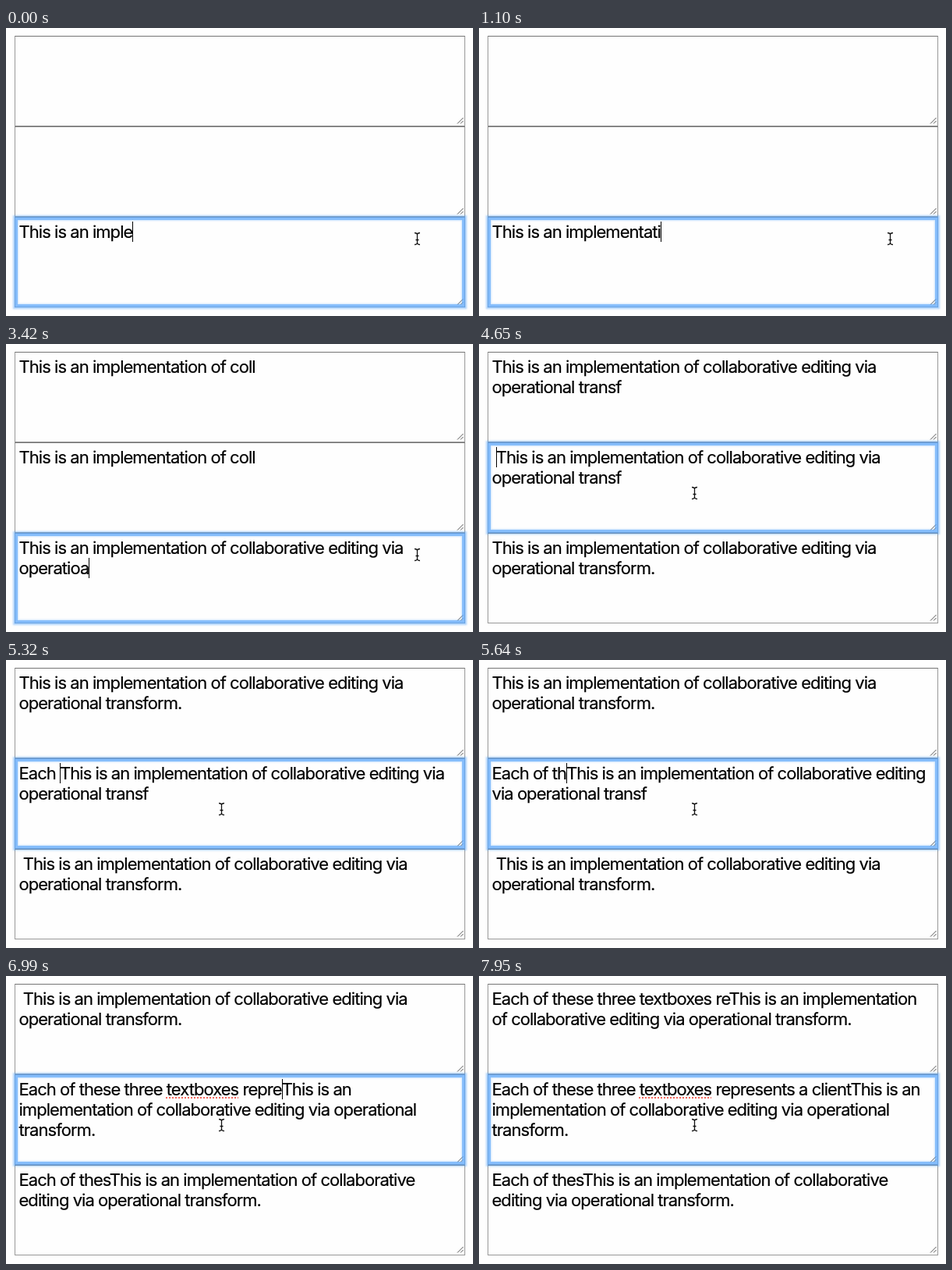
An HTML page for the animation above (8000 ms loop, 599x369 px).

```html
<!DOCTYPE html>
<html lang="en">
<head>
<meta charset="utf-8">
<title>Collaborative editing</title>
<style>
  html, body { margin: 0; width: 100%; height: 100%; overflow: hidden; background: #fff; }
  #stage { position: relative; width: 599px; height: 369px; overflow: hidden; background: #fefefe; }
  .box {
    position: absolute; left: 11px; width: 578px; height: 116px; box-sizing: border-box;
    border: 1px solid #999; border-top-color: #757575; background: #fefefe;
  }
  .box.focus { z-index: 1; }
  .box.focus::after {
    content: ''; position: absolute; inset: -1px;
    box-shadow: 0 0 2px 2px rgb(94 168 250 / .5),
      inset 0 0 0 4px rgb(94 168 250 / .65), inset 0 0 2px 5px rgb(94 168 250 / .3);
  }
  .text {
    position: absolute; left: 4.5px; top: 5px; width: 565px;
    font: 22px/26px Inter, Roboto, sans-serif; font-optical-sizing: none;
    letter-spacing: -.96px; white-space: pre-wrap; color: #000;
    -webkit-text-stroke: .2px #000;
  }
  .caret { position: absolute; width: 1px; height: 26px; background: #000; }
  .misspelt {
    text-decoration: underline dotted #f4665c 2px;
    text-underline-offset: 2px; text-decoration-skip-ink: none;
  }
  .grip { position: absolute; right: 1px; bottom: 2px; }
  #pointer { position: absolute; left: -6px; top: -9px; z-index: 2; }
</style>
</head>
<body>
<div id="stage">
  <svg id="pointer" width="12" height="18" fill="none">
    <path id="beam" d="M2.5 1.5Q6 1.5 6 4V14Q6 16.5 2.5 16.5M9.5 1.5Q6 1.5 6 4M6 14Q6 16.5 9.5 16.5M4 10.5H8" stroke="#fff" stroke-width="3"/>
    <use href="#beam" style="display:none"/>
    <path d="M2.5 1.5Q6 1.5 6 4V14Q6 16.5 2.5 16.5M9.5 1.5Q6 1.5 6 4M6 14Q6 16.5 9.5 16.5M4 10.5H8" stroke="#111" stroke-width="1.3"/>
  </svg>
</div>
<script>
const LOOP = 8000, FOCUS_SWITCH = 4520, CARET_OFF = 7950;
const stage = document.getElementById('stage');
const pointer = document.getElementById('pointer');
const CARET = '<i class="caret"></i>';
const SENTENCE = 'This is an implementation of collaborative editing via operational transform.';
const upTo = part => SENTENCE.slice(0, SENTENCE.indexOf(part) + part.length);

const boxes = [10, 126, 242].map(top => {
  const box = document.createElement('div');
  box.className = 'box';
  box.style.top = top + 'px';
  box.innerHTML = `<div class="text"></div>
    <svg class="grip" width="9" height="9" stroke="#555"><path d="M1 8.5L8.5 1M5 8.5L8.5 5"/></svg>`;
  stage.append(box);
  return { box, text: box.querySelector('.text'), shown: null };
});

// The part of a text typed by time t, evenly from the first key to the last.
function typed(t, text, first, last = first) {
  if (t < first) return '';
  if (t >= last) return text;
  return text.slice(0, 1 + Math.floor((t - first) / (last - first) * (text.length - 1)));
}

// The latest value whose time has come.
function latest(t, ...steps) {
  return steps.reduce((value, [time, next]) => t >= time ? next : value, '');
}

function typedSentence(t) {
  const word = t < 470
    ? 'imple' + typed(t, 'mentatio', 30, 410)
    : typed(t, 'implementation of ', 620, 1350);
  return 'This is an ' + word
    + typed(t, 'collaborative ', 1560, 2240) + typed(t, 'e', 2300)
    + typed(t, 'diting via operatio', 2390, 3160)
    + latest(t, [3220, 'a'], [3250, 'an'], [3420, 'a'], [3510, ''])
    + typed(t, 'nal transform.', 3560, 4200);
}

function typedPrefix(t) {
  return latest(t, [4600, ' '], [4730, 'E'], [4880, 'Ea'])
    + typed(t, 'ch of th', 5090, 5640)
    + typed(t, 'ese three text', 5700, 6360)
    + typed(t, 'boxes ', 6450, 6680)
    + typed(t, 'represents a clie', 6770, 7570)
    + typed(t, 'n', 7620) + typed(t, 't', 7710);
}

function contents(t) {
  const caret = t < CARET_OFF ? CARET : '';
  const received = latest(t, [1900, 'T'], [3000, upTo('coll')], [4100, upTo('transf')]);
  const first = latest(t, [5800, ' '], [7200, 'Each of thes'], [7620, 'Each of these three textboxes re'])
    + (t < 5230 ? received : SENTENCE);
  const prefix = typedPrefix(t).replace('textboxes ', '<span class="misspelt">textboxes</span> ');
  const second = prefix + (t < FOCUS_SWITCH ? '' : caret) + (t < 5750 ? received : SENTENCE);
  const third = latest(t, [5230, ' '], [6550, 'Each of thes'])
    + typedSentence(t) + (t < FOCUS_SWITCH ? caret : '');
  return [first, second, third];
}

function draw(t) {
  const focused = t < FOCUS_SWITCH ? 2 : 1;
  contents(t).forEach((html, i) => {
    const item = boxes[i];
    item.box.classList.toggle('focus', i === focused);
    if (item.shown !== html) item.text.innerHTML = item.shown = html;
  });
  const p = Math.min(1, Math.max(0, (t - 4190) / 290));
  const ease = p * p * (3 - 2 * p);
  pointer.style.transform = `translate(${527.5 - 251 * ease}px, ${270 - 79 * ease}px)`;
}

let start;
function frame(now) {
  start ??= now;
  draw((now - start) % LOOP);
  requestAnimationFrame(frame);
}
draw(0);
requestAnimationFrame(frame);
</script>
</body>
</html>
```
